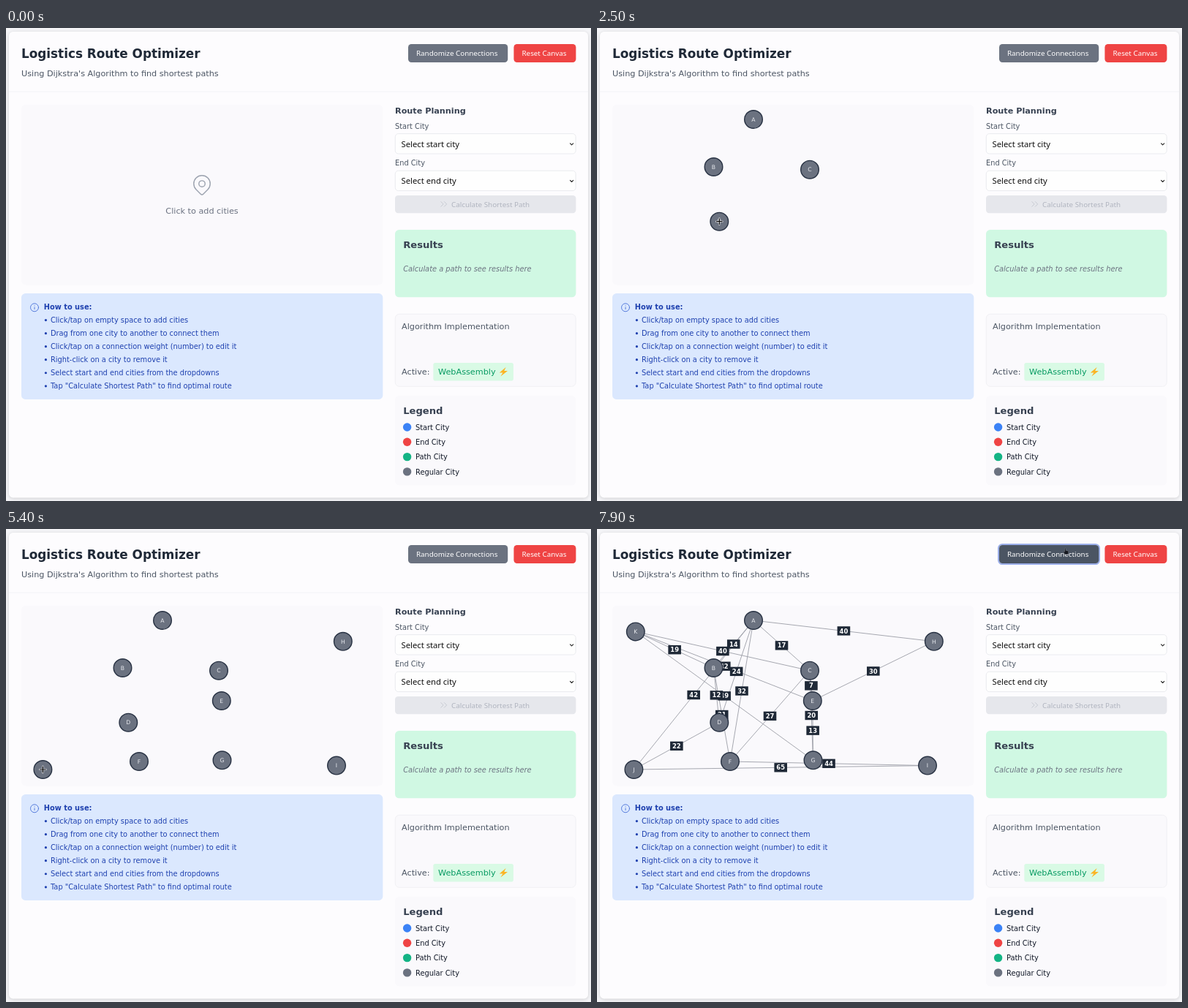
An HTML page for the animation above (8 s loop, 800 px wide and 647 px high).

```html
<!DOCTYPE html>
<html lang="en">
<head>
<meta charset="utf-8">
<title>Logistics Route Optimizer</title>
<style>
html, body { margin: 0; width: 100%; height: 100%; overflow: hidden; background: #f5f5f8; }
svg { display: block; width: 800px; height: 647px; font: 9.825px "DejaVu Sans", sans-serif; }
.card { fill: #fdfcfe; filter: drop-shadow(0 1.5px 2.5px rgba(0,0,0,.16)); }
.panel { fill: #faf9fc; }
.field { fill: #fefefe; stroke: #e5e6eb; stroke-width: .8; }
.line { fill: none; stroke-linecap: round; stroke-linejoin: round; }
.big { font-size: 11.23px; }
.head { font-size: 13.14px; }
.b { font-weight: bold; }
.ui { font-family: "Noto Sans", "Open Sans", sans-serif; }
.med { font-weight: 500; }
.ink { fill: #374151; }
.soft { fill: #4b5563; }
.mute { fill: #6b7280; }
.blue { fill: #1e40af; }
.white { fill: #fff; }
.ring { fill: none; stroke-width: 2; }
.tag { font-size: 8.42px; font-weight: bold; fill: #fff; text-anchor: middle; }
.name { font-size: 7.7px; fill: #e8eaee; text-anchor: middle; }
</style>
</head>
<body>
<svg id="stage" viewBox="0 0 800 647">
  <rect class="card" x="4" y="5" width="792" height="637.5" rx="5.6"/>
  <path d="M4 87H796" stroke="#f1f1f4" stroke-width=".9"/>
  <text x="21" y="40.6" class="b" font-size="16.84" fill="#1f2937">Logistics Route Optimizer</text>
  <text x="21" y="65.7" class="big soft">Using Dijkstra's Algorithm to find shortest paths</text>

  <rect id="randomRing" class="ring" x="549" y="21" width="138" height="27" rx="5.4" stroke="rgba(92,126,222,.6)"/>
  <rect id="random" x="550" y="22" width="136.2" height="25" rx="4.4"/>
  <text x="561" y="38" class="ui med white">Randomize Connections</text>
  <rect id="resetRing" class="ring" x="693.4" y="21" width="87" height="27" rx="5.4" stroke="rgba(239,68,68,.4)"/>
  <rect x="694.4" y="22" width="85" height="25" rx="4.4" fill="#ef4444"/>
  <text x="705.5" y="38" class="ui med white">Reset Canvas</text>

  <rect class="panel" x="21" y="105" width="494.3" height="246.5" rx="5.6"/>
  <g id="hint">
    <path class="line" transform="translate(251.15 197.6) scale(1.404)" stroke="#9ca3af" stroke-width="1"
      d="M17.657 16.657L13.414 20.9a2 2 0 0 1-2.827 0l-4.244-4.243a8 8 0 1 1 11.314 0zM15 11a3 3 0 1 1-6 0 3 3 0 0 1 6 0z"/>
    <text x="268" y="253.5" class="big mute" text-anchor="middle">Click to add cities</text>
  </g>

  <rect x="21" y="363" width="494.3" height="145" rx="5.6" fill="#dbe8fe"/>
  <g class="line" stroke="#4a72d8" stroke-width=".9"><circle cx="39" cy="382.3" r="5.5"/><path d="M39 382v2.6M39 379.8v.1"/></g>
  <text x="51.8" y="384.7" class="b blue">How to use:</text>
  <g id="steps" class="blue"></g>

  <text x="532" y="116.6" class="big b ink">Route Planning</text>
  <text x="532" y="137.6" class="soft">Start City</text>
  <text x="532" y="188.4" class="soft">End City</text>
  <g id="fields"></g>
  <rect x="532" y="229" width="247.4" height="24.2" rx="4.2" fill="#e6e7ec"/>
  <path class="line" stroke="#c3c7d0" stroke-width=".9" d="M594.8 237.6l3.3 3.3-3.3 3.3M599.4 237.6l3.3 3.3-3.3 3.3"/>
  <text x="609" y="244.6" class="ui med" fill="#b0b4bf">Calculate Shortest Path</text>

  <rect x="532" y="276" width="247.4" height="92.3" rx="5.6" fill="#d0f8e3"/>
  <text x="543.2" y="301.3" class="head b ink">Results</text>
  <text x="543.2" y="332.6" class="mute" font-style="italic">Calculate a path to see results here</text>

  <rect class="panel" x="532.3" y="391.3" width="246.8" height="99" rx="5.6" stroke="#eeeef2" stroke-width=".8"/>
  <text x="541" y="412.2" class="big soft">Algorithm Implementation</text>
  <text x="541" y="474" class="big soft">Active:</text>
  <rect x="584.3" y="458" width="109.6" height="24.5" rx="2.8" fill="#d9fae5"/>
  <text x="591" y="474" class="big" fill="#079a62">WebAssembly</text>
  <path d="M683.6 464L674.8 471.4h4.6L676.4 476.4L686 469h-4.8z" fill="#fbb424"/>

  <rect class="panel" x="532" y="503" width="247.4" height="122.5" rx="5.6"/>
  <text x="543.2" y="527.6" class="head b ink">Legend</text>
  <g id="legend" fill="#111827"></g>

  <g id="edges"></g>
  <g id="nodes"></g>
  <g id="cursor">
    <path id="cross" class="line" d="M-4.2 0H4.2M0-4.2V4.2" stroke="#fff" stroke-opacity=".6" stroke-width="2.4"/>
    <path id="plus" d="M-4.2 0H4.2M0-4.2V4.2" stroke="#111" stroke-width="1.2"/>
    <path id="arrow" d="M0 0V9.5L2.3 7.4L3.8 10.8L5.2 10.2L3.7 6.9H6.8Z" fill="#111" stroke="#fff" stroke-width=".6"/>
    <path id="hand" d="M-1.4-3.4Q-.6-4.3.1-3.4V-.8L3.4 0Q4 .4 3.8 2L3 4.8H-1L-3.2 1.4Q-3 .4-1.4 1.2Z" fill="#15181f" stroke="#9aa0aa" stroke-width=".4"/>
  </g>
</svg>
<script>
const $ = id => document.getElementById(id);
const show = (el, on) => { el.style.display = on ? "" : "none"; };

$("steps").innerHTML = [
  "Click/tap on empty space to add cities",
  "Drag from one city to another to connect them",
  "Click/tap on a connection weight (number) to edit it",
  "Right-click on a city to remove it",
  "Select start and end cities from the dropdowns",
  'Tap "Calculate Shortest Path" to find optimal route'
].map((s, i) => {
  const y = 402.8 + 18.04 * i;
  return `<circle cx="54.4" cy="${y - 3.2}" r="1.6"/><text x="61" y="${y}">${s}</text>`;
}).join("");

const field = (x, y, w, label) => `<rect class="field" x="${x}" y="${y}" width="${w}" height="27.4" rx="4.2"/>
  <text class="big ui" x="${x + 8.3}" y="${y + 17.9}" fill="#111">${label}</text>
  <path class="line" d="M${x + w - 7.6} ${y + 13.2}l2.1 2.1 2.1-2.1" stroke="#222" stroke-width="1.1"/>`;
$("fields").innerHTML = field(532.3, 144.6, 246.8, "Select start city") +
  field(532.3, 195.2, 246.8, "Select end city") +
  field(541.2, 422.6, 229, "Auto (WASM if available)");

$("legend").innerHTML = [["Start", "#3b82f6"], ["End", "#ef4444"], ["Path", "#14b485"], ["Regular", "#6b7280"]]
  .map(([s, c], i) => {
    const y = 546 + 20.3 * i;
    return `<circle cx="548.6" cy="${y}" r="5.7" fill="${c}"/><text x="560" y="${y + 3.7}">${s} City</text>`;
  }).join("");

// city: x, y, time added
const cities = {
  A: [214, 125, 900], B: [159.5, 190, 1600], C: [291, 193.7, 2100], D: [167.3, 264.7, 2400],
  E: [294.8, 235, 2900], F: [182, 318, 3300], G: [295.5, 316.3, 3700], H: [460.8, 153.8, 4200],
  I: [452, 323.6, 4800], J: [50.4, 329, 5300], K: [52.8, 140.4, 5800]
};
const links = "KB19 KC40 KE42 KG49 AB14 AC17 AD24 AF32 AH40 AJ42 BF21 BD12 CE7 CF27 CG20 EG13 EH30 FI44 JD22 JI65"
  .split(" ").map(s => [cities[s[0]], cities[s[1]], s.slice(2)]);

$("edges").innerHTML =
  links.map(([a, b]) => `<path d="M${a[0]} ${a[1]}L${b[0]} ${b[1]}" stroke="#9c9fa8" stroke-width=".9"/>`).join("") +
  links.map(([a, b, w]) => {
    const x = (a[0] + b[0]) / 2, y = (a[1] + b[1]) / 2;
    return `<rect x="${x - 8.8}" y="${y - 6.2}" width="17.6" height="12.4" fill="#1f2937"/><text class="tag" x="${x}" y="${y + 3.1}">${w}</text>`;
  }).join("");

$("nodes").innerHTML = Object.entries(cities).map(([k, [x, y]]) =>
  `<g><circle cx="${x}" cy="${y}" r="12.3" fill="#6b7280" stroke="#273142" stroke-width="1.4"/><text class="name" x="${x}" y="${y + 2.7}">${k}</text></g>`).join("");
const nodes = [...$("nodes").children], added = Object.values(cities).map(c => c[2]);

// pointer path: time, then a city or a point
const path = [
  [400, 520, 75], [800, "A"], [1050, "A"], [1500, "B"], [1750, "B"], [2050, "C"], [2150, "C"],
  [2400, "D"], [2550, "D"], [2850, "E"], [2950, "E"], [3200, "F"], [3350, "F"], [3650, "G"], [3700, "G"],
  [3900, 375.7, 236.3], [4100, "H"], [4300, "H"], [4700, 452.8, 317], [4800, "I"], [4900, "I"],
  [5250, "J"], [5550, "J"], [5800, "K"], [6050, "K"], [6300, 100.7, 129.5], [6850, 641, 30], [8000, 641, 30]
].map(([t, x, y]) => y === undefined ? [t, cities[x][0], cities[x][1]] : [t, x, y]);

function pointer(t) {
  const i = Math.max(1, path.findIndex(p => p[0] >= t));
  const [t0, x0, y0] = path[i - 1], [t1, x1, y1] = path[i];
  const k = (t - t0) / (t1 - t0);
  return [x0 + (x1 - x0) * k, y0 + (y1 - y0) * k];
}

function draw(now) {
  const t = Math.floor(now % 8000 / 100) * 100;
  show($("hint"), t < 900);
  nodes.forEach((n, i) => show(n, t >= added[i]));
  show($("edges"), t >= 7200);
  show($("randomRing"), t >= 7200);
  show($("resetRing"), t >= 100 && t < 1200);

  show($("cursor"), t >= 400);
  const [x, y] = pointer(Math.max(t, 400));
  const inMap = x > 21 && x < 515 && y > 105 && y < 351;
  const hover = t >= 400 && x > 550 && x < 686 && y > 22 && y < 47;
  $("cursor").setAttribute("transform", `translate(${x} ${y})`);
  show($("cross"), inMap);
  show($("plus"), inMap);
  show($("hand"), hover);
  show($("arrow"), !inMap && !hover);
  $("random").setAttribute("fill", hover ? "#4b5563" : "#6b7280");
  requestAnimationFrame(draw);
}
draw(0);
</script>
</body>
</html>
```
